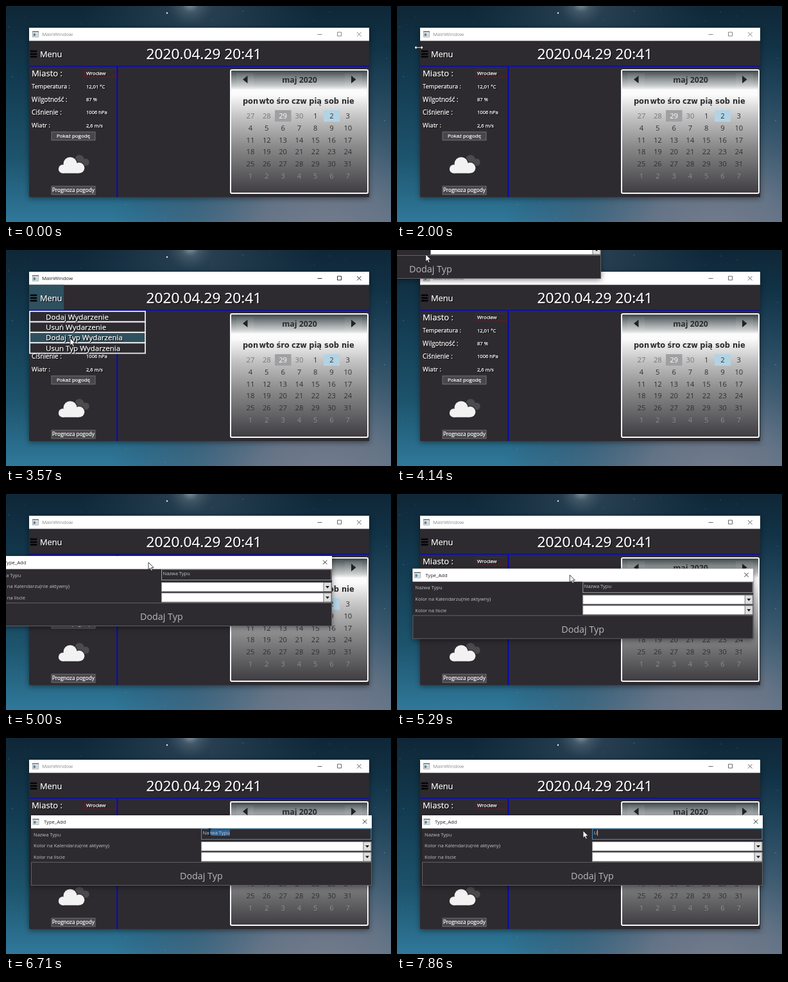
Recreate the animation shown at these times as an HTML page. Size 600 by 338 pixels, loop 8 s.

```html
<!DOCTYPE html>
<html lang="pl">
<head>
<meta charset="utf-8">
<title>Kalendarz</title>
<style>
html, body { margin: 0; width: 100%; height: 100%; overflow: hidden; background: #17364b; }
svg { display: block; width: 100vw; height: 100vh; }
text { font-family: "Open Sans", "Noto Sans", sans-serif; white-space: pre; }
.glow text { fill: #fff; stroke: #fff; stroke-width: .25; filter: drop-shadow(1px 1px .4px #000); }
.verdana { font-family: "DejaVu Sans", sans-serif; font-weight: bold; }
.window { filter: drop-shadow(0 2px 4px rgba(0, 0, 0, .45)); }
</style>
</head>
<body>
<svg id="stage" viewBox="0 0 600 338" preserveAspectRatio="none"></svg>
<script>
const stage = document.getElementById('stage');
const PANEL = '#2d2b30';
const LOOP = 8000, FPS = 7;

const rect = (x, y, w, h, fill, extra = '') =>
  `<rect x="${x}" y="${y}" width="${w}" height="${h}" fill="${fill}" ${extra}/>`;
const text = (x, y, size, str, fill = '#fff', extra = '') =>
  `<text x="${x}" y="${y}" font-size="${size}" fill="${fill}" ${extra}>${str}</text>`;
const path = (d, fill, extra = '') => `<path d="${d}" fill="${fill}" ${extra}/>`;
const circle = (x, y, r, fill, extra = '') => `<circle cx="${x}" cy="${y}" r="${r}" fill="${fill}" ${extra}/>`;
const group = (attrs, ...parts) => `<g ${attrs}>${parts.join('')}</g>`;
const stops = list => list.map(([at, color, alpha = 1]) =>
  `<stop offset="${at}" stop-color="${color}" stop-opacity="${alpha}"/>`).join('');
const vertical = (id, list) =>
  `<linearGradient id="${id}" x1="0" y1="0" x2="0" y2="1">${stops(list)}</linearGradient>`;
const radial = (id, cx, cy, r, list) =>
  `<radialGradient id="${id}" gradientUnits="userSpaceOnUse" cx="${cx}" cy="${cy}" r="${r}">${stops(list)}</radialGradient>`;

function stars() {
  let seed = 11;
  const rnd = () => (seed = seed * 16807 % 2147483647) / 2147483647;
  return Array.from({ length: 110 }, () =>
    circle(rnd() * 600, rnd() * 338, .3 + rnd() * .4, '#b9d2e2', `opacity="${.15 + rnd() * .4}"`)).join('') +
    circle(251, 11, 1.2, '#e4f0f6');
}

const appIcon = (x, y) => group(`transform="translate(${x} ${y})"`,
  rect(.5, .5, 9, 8.5, '#f6f6f6', 'stroke="#999" stroke-width=".8"'),
  rect(0, 0, 10, 1.6, '#777'), rect(1.6, 3.2, 3.6, 4.4, '#4f8fa8'), rect(6, 3.2, 2.4, 4.4, '#c3ced4'));

const button = (y, x, label, size) =>
  rect(71, y, 68, 13, '#48464b', 'stroke="#77757a" stroke-width=".9"') +
  text(x, y + 9.4, size, label, '#fff', 'stroke="#fff" stroke-width=".2"');

function cloud(x, y, s, fill, extra = '') {
  const bumps = circle(7, 18.5, 6.7, fill) + circle(18.5, 10.5, 10.5, fill) +
    circle(32.5, 16.8, 8.3, fill) + rect(7, 14, 25, 11.2, fill);
  return group(`transform="translate(${x} ${y}) scale(${s})" ${extra}`, bumps);
}

function calendar() {
  const colX = i => 381 + i * 25.3, rowY = i => 176.3 + i * 18.7;
  const names = ['pon', 'wto', 'śro', 'czw', 'pią', 'sob', 'nie'];
  let days = '';
  for (let i = 0; i < 42; i++) {
    const day = i < 4 ? 27 + i : i < 35 ? i - 3 : i - 34;
    const fill = i === 2 ? '#fff' : i < 4 ? '#777' : i < 35 ? '#303032' : '#8c8c8e';
    days += text(colX(i % 7), rowY(i / 7 | 0), 11.2, day, fill);
  }
  return rect(350, 100, 214, 193, 'url(#calBody)', 'rx="2"') +
    rect(351, 101, 212, 30, 'url(#calHead)') +
    rect(359, 105, 27, 22, '#fff', 'opacity=".06"') + rect(528, 105, 27, 22, '#fff', 'opacity=".06"') +
    path('M376.5 109v12l-7.5-6z', '#222') + path('M538 109v12l7.5-6z', '#222') +
    rect(350, 100, 214, 193, 'none', 'rx="2" stroke="#f6f9f9" stroke-width="2"') +
    rect(419, 163, 25.5, 18, '#a0a0a3') + rect(495, 163, 25, 18, '#b3d3e4') +
    group('text-anchor="middle"',
      text(457.5, 120.2, 12.3, 'maj 2020', '#2b2b2d', 'font-weight="bold"'),
      ...names.map((n, i) => text(colX(i), 152.7, 11.4, n, '#2c2c2e', 'class="verdana"')), days);
}

function mainWindow() {
  return group('class="window"', rect(36, 34, 530, 265, PANEL)) +
    rect(36, 34, 530, 20.5, '#fff') + appIcon(41, 39.5) +
    text(56, 47.3, 7.9, 'MainWindow', '#888', 'id="mainTitle"') +
    path('M485.5 44.5h7M516.5 41h6v6h-6zM547 41l6.6 6.6m0-6.6l-6.6 6.6', 'none',
      'id="mainButtons" stroke="#888" stroke-width=".9"') +
    rect(36, 54.5, 54, 39.5, '#2f505f', 'id="menuHover"') +
    [69.5, 73.8, 78.1].map(y => rect(37.5, y, 11, 2.6, '#050505', 'rx="1"')).join('') +
    group('class="glow"', text(53, 79.7, 12.8, 'Menu'), text(218.5, 82.8, 22.7, '2020.04.29 20:41')) +
    rect(36, 93.6, 530, 1.5, '#0a0abc') +
    rect(172.3, 95, 2.2, 204, '#0a0ab4') +
    group('class="glow"',
      text(40, 110.3, 13.1, 'Miasto :'), text(40, 129.2, 9.2, 'Temperatura :'),
      text(40, 149.5, 9.9, 'Wilgotność :'), text(40, 169.8, 9.9, 'Ciśnienie :'), text(40, 190.2, 9.6, 'Wiatr :'),
      rect(122.5, 99.5, 49, 11.5, 'none', 'stroke="#7c1420" stroke-width=".8"'),
      text(125, 108.2, 7.7, 'Wrocław'), text(125, 128.5, 7.6, '12,01 °C'), text(125, 148.8, 7.6, '87 %'),
      text(125, 169.1, 7.6, '1006 hPa'), text(125, 189.5, 7.6, '2,6 m/s')) +
    button(197, 79, 'Pokaż pogodę', 7.95) + button(282, 72, 'Prognoza pogody', 8.1) +
    cloud(102, 233, .68, '#4b4a4d') +
    cloud(81.5, 236.5, 1, '#f2f2f2', `style="filter: drop-shadow(1px -1px 0 ${PANEL})"`) + calendar();
}

function menuPanel() {
  const items = ['Dodaj Wydarzenie', 'Usuń Wydarzenie', 'Dodaj Typ Wydarzenia', 'Usun Typ Wydarzenia'];
  const top = i => 96 + i * 16.4;
  return group('id="menu"',
    rect(37, 96, 180, 65.6, PANEL),
    rect(37, 96, 180, 16.4, '#2f505f', 'id="itemHover"'),
    ...items.map((_, i) => rect(37, top(i), 180, 16.4, 'none', 'stroke="#ececec" stroke-width="1.8"')),
    group('class="glow"', ...items.map((s, i) => text(62, top(i) + 12.6, 11.55, s))));
}

const combo = y => rect(304.5, y, 264.5, 14, '#fff', 'stroke="#9a9a9a"') +
  rect(557, y, 12, 14, '#dedede', 'stroke="#777"') + path(`M560 ${y + 5.5}h6l-3 3.6z`, '#111');

function dialog() {
  return group('id="dialog"',
    group('class="window"', rect(39, 121, 531, 110, PANEL)),
    rect(39, 121, 531, 20.5, '#fff'), appIcon(41.5, 126.5),
    text(59, 133.8, 7.6, 'Type_Add', '#222'),
    path('M556 127.6l6.4 6.4m0-6.4l-6.4 6.4', 'none', 'stroke="#222" stroke-width=".9"'),
    text(43, 153.7, 7.5, 'Nazwa Typu', '#c4c4c6'),
    text(43, 171.3, 7.6, 'Kolor na Kalendarzu(nie aktywny)', '#c4c4c6'),
    text(43, 188.8, 7.6, 'Kolor na liscie', '#c4c4c6'),
    rect(304.5, 142, 264.5, 16.6, PANEL, 'id="field" stroke="#aaa"'),
    rect(0, 143.5, 0, 9.5, '#3399ff', 'id="selection" opacity=".5"'),
    text(306.5, 151.2, 7.5, '', '#c8c8ca', 'id="fieldText"'),
    rect(312, 143.8, .8, 9, '#e0e0e0', 'id="caret"'),
    combo(162.5), combo(179),
    rect(39.5, 194.5, 530, 36, PANEL, 'stroke="#626065"'),
    text(271, 220.8, 14.3, 'Dodaj Typ', '#b9b9bb'));
}

const cursors =
  group('id="arrow"', path('M0 0v11.4l2.6-2.4 1.8 4.2 1.9-.8-1.8-4.1h3.6z', '#fff', 'stroke="#111" stroke-width=".8"')) +
  group('id="resize"', path('M-7 0l3.6-3.4v2.5h6.8v-2.5L7 0 3.4 3.4V.9h-6.8v2.5z', '#fff', 'stroke="#111" stroke-width=".8"')) +
  group('id="beam"', path('M-2-5h1.6l.4.5.4-.5H2M0-4.5v9M-2 5h1.6l.4-.5.4.5H2', 'none', 'stroke="#080808" stroke-width="1"'));

stage.innerHTML = '<defs>' +
  vertical('sky', [[0, '#0f2737'], [.35, '#133c52'], [.7, '#1d546d'], [1, '#30789a']]) +
  radial('dusk', 500, 390, 340, [[0, '#7f7f8d', .95], [.35, '#6d7484', .85], [.65, '#4a5a6e', .5], [1, '#36495e', 0]]) +
  radial('haze', 300, -20, 190, [[0, '#3c5264', .7], [1, '#2b4356', 0]]) +
  radial('glimmer', 287, -4, 36, [[0, '#b9c6cc', .75], [.4, '#71838f', .35], [1, '#506674', 0]]) +
  vertical('calBody', [[0, '#fff'], [.2, '#fbfbfb'], [.38, '#c4c4c5'], [.62, '#8a8a8b'], [1, '#3e3c40']]) +
  vertical('calHead', [[0, '#3f484a'], [.35, '#7f8587'], [.8, '#c8cbcc'], [1, '#f8f8f8']]) +
  '</defs>' + ['sky', 'haze', 'glimmer', 'dusk'].map(id => rect(0, 0, 600, 338, `url(#${id})`)).join('') +
  stars() + mainWindow() + menuPanel() + dialog() + cursors;

const el = Object.fromEntries([...stage.querySelectorAll('[id]')].map(n => [n.id, n]));
const show = (node, on) => node.setAttribute('display', on ? 'inline' : 'none');
const move = (node, x, y) => node.setAttribute('transform', `translate(${x} ${y})`);

// Each step: time, x, y
const pointerPath = [
  [1430, -12, 60], [1860, 30, 65], [2000, 34, 65], [2290, 48, 72], [2570, 62, 78], [3000, 62, 78],
  [3290, 82, 104], [3570, 100, 138], [3860, 100, 138], [4140, 45, 8], [4290, 32, -55]];
const dragPath = [[4290, -252, -186], [4570, -190, -125], [4860, -100, -50], [5000, -62, -24], [5290, -14, -4], [5430, 0, 0]];
const fieldPath = [
  [5430, 284, 131], [5710, 318, 148], [5860, 328, 152], [6140, 351, 149], [6290, 351, 149],
  [6720, 300, 146], [6860, 290, 145]];

function at(steps, t) {
  const i = steps.findIndex(s => s[0] > t);
  if (i === 0) return steps[0].slice(1);
  if (i < 0) return steps[steps.length - 1].slice(1);
  const [a, b] = [steps[i - 1], steps[i]], k = (t - a[0]) / (b[0] - a[0]);
  return [1, 2].map(n => a[n] + (b[n] - a[n]) * k);
}

function render(t) {
  const offset = at(dragPath, t);
  const [x, y] = t < 4290 ? at(pointerPath, t) : t < 5430 ? [offset[0] + 284, offset[1] + 131] : at(fieldPath, t);
  const menuOpen = t >= 2700 && t < 3840, dialogOpen = t >= 3840;

  el.mainTitle.setAttribute('fill', menuOpen ? '#222' : '#8a8a8a');
  el.mainButtons.setAttribute('stroke', dialogOpen ? '#555' : menuOpen ? '#111' : '#777');
  show(el.menuHover, t >= 2290 && t < 3840);
  show(el.menu, menuOpen);
  const row = Math.floor((y - 96) / 16.4);
  show(el.itemHover, row >= 0 && row < 4);
  el.itemHover.setAttribute('y', 96 + Math.max(0, row) * 16.4);

  show(el.dialog, dialogOpen);
  move(el.dialog, ...offset);
  const typed = t >= 7560, focused = t >= 6130;
  el.fieldText.textContent = typed ? 'U' : 'Nazwa Typu';
  el.field.setAttribute('stroke', focused ? '#4a93c0' : t >= 5700 ? '#8fb4d4' : '#a2a2a4');
  const selecting = t >= 6290 && !typed, left = Math.max(306.5, Math.min(x, 349));
  show(el.selection, selecting);
  el.selection.setAttribute('x', left);
  el.selection.setAttribute('width', 349 - left);
  show(el.caret, typed || focused && !selecting);
  el.caret.setAttribute('x', typed ? 312 : 349.3);

  const beam = t >= 5700 && t < 6850, resize = t >= 1840 && t < 2130;
  show(el.beam, beam);
  show(el.resize, resize);
  show(el.arrow, t >= 1430 && !beam && !resize);
  [el.arrow, el.beam, el.resize].forEach(n => move(n, x, y));
}

const start = performance.now();
function tick() {
  const t = (performance.now() - start) % LOOP;
  const step = Math.min(LOOP * FPS / 1000 - 1, Math.floor((t + 3) * FPS / 1000));
  render(step * 1000 / FPS);
  requestAnimationFrame(tick);
}
tick();
</script>
</body>
</html>
```
